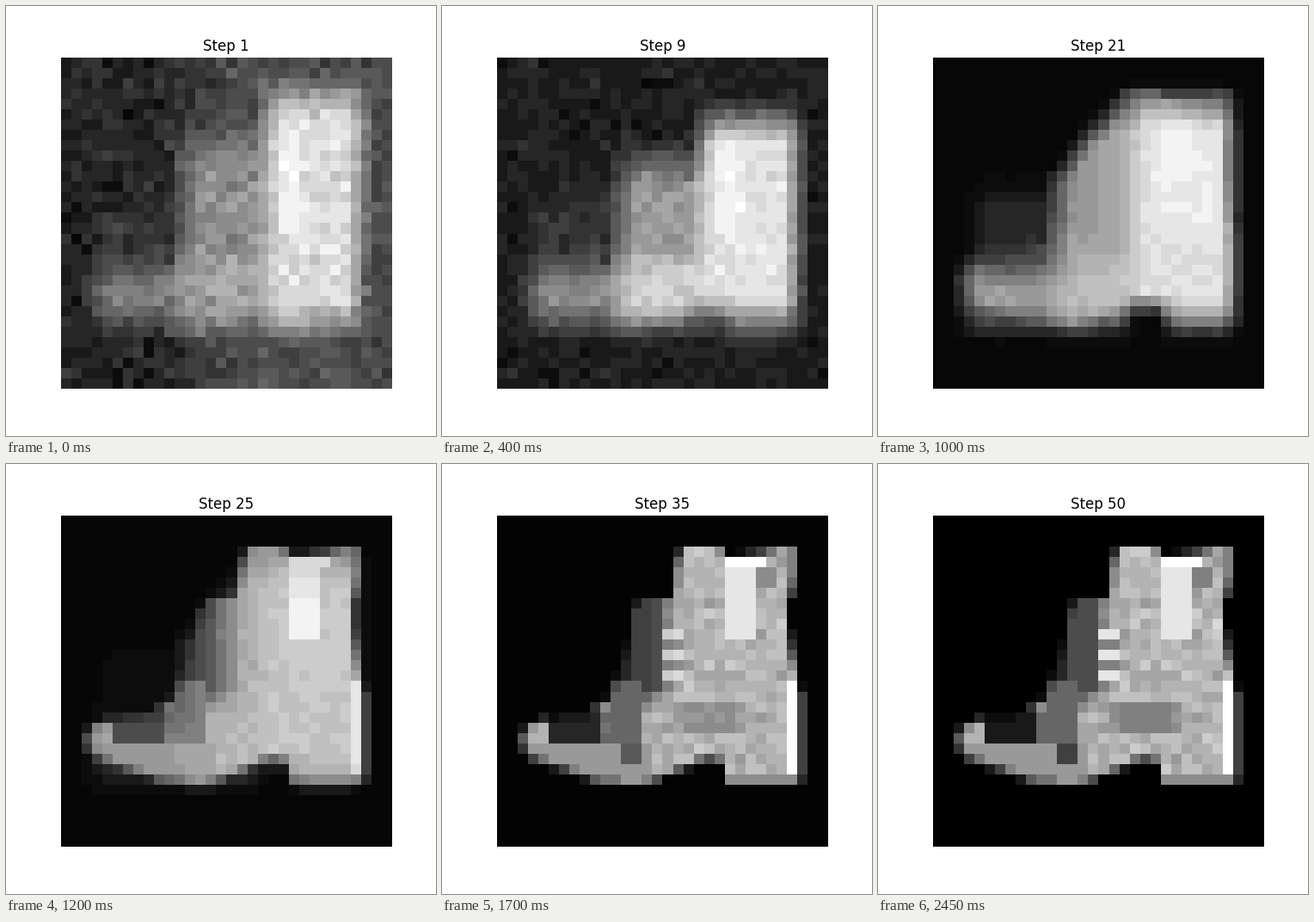
Recreate the animation shown at these times as a matplotlib script. Size 500 px wide and 500 px high, loop 2.5 s.

```python
import numpy as np
import matplotlib.pyplot as plt
from matplotlib.animation import FuncAnimation
from matplotlib.path import Path

N = 32
STEPS = 50
LEVELS = 20
SKETCH_END = 21

x = np.arange(N) + 0.5
y = x[:, None]
rng = np.random.default_rng(4)
grain_a, grain_b, texture = rng.standard_normal((3, N, N))


def smoothstep(start, end, s):
    t = np.clip((s - start) / (end - start), 0, 1)
    return t * t * (3 - 2 * t)


def rise(pos, edge, width):
    return np.clip((pos - edge) / width + 0.5, 0, 1)


def paint(img, value, left, right, top, bottom, wx=0.1, wy=0.1, weight=1):
    """Blend a value into a box; wx and wy are the widths of its soft edges."""
    across = rise(x, left, wx) * rise(-x, -right, wx)
    down = rise(y, top, wy) * rise(-y, -bottom, wy)
    img += (value - img) * across * down * weight


def coverage(points, sub=4):
    """Share of each cell that lies inside the polygon."""
    axis = (np.arange(N * sub) + 0.5) / sub
    px, py = np.meshgrid(axis, axis)
    inside = Path(points).contains_points(np.column_stack([px.ravel(), py.ravel()]))
    return inside.reshape(N, sub, N, sub).mean(axis=(1, 3))


outline = coverage([
    (18, 3), (21.4, 3), (22, 4), (25, 3.8), (28, 3), (29, 3), (29, 6),
    (28.1, 8), (28.1, 11.5), (29, 16), (29.35, 18), (29.35, 25), (29, 26),
    (22, 26), (22, 23.8), (20.3, 23.3), (14, 26), (10, 25.7), (3, 23.2),
    (2.4, 21.5), (3, 20.3), (5, 19.6), (9, 19), (11, 17.5), (13, 11.5),
    (13, 9.5), (14, 8), (17, 8), (17.3, 5),
])


def sketch(step):
    """Blurry masses of shaft, ankle and toe that sharpen as p goes to 1."""
    p = np.clip((step - 1) / (SKETCH_END - 1), 0, 1)
    late = p ** 4
    swell = np.sin(np.pi * p) ** 2
    ground = 0.14 * (1 - p * p)
    lean = 0.7 * late * np.maximum(0, 12 - y)

    img = np.full((N, N), ground)
    paint(img, 0.3, 13, 40, -9, 40, 8, 1, (1 - p) ** 8)
    paint(img, 0.2, 4, 13, 13, 20, 3, 5)
    paint(img, 0.48 + 0.14 * p, 3.2, 15, 20, 25.6, 3, 4)
    paint(img, 0.56 + 0.1 * p, 12 + lean, 23, 8 + 2.5 * swell - 3 * late, 25.4, 3, 5)
    paint(img, 0.65 + 0.1 * p + 0.15 * swell, 12, 22.5, 19.7, 25, 3, 3)
    paint(img, 0.86 + 0.05 * p, 20 - 0.6 * p, 28.9, 3.5 + p + 2.5 * swell, 25.6, 2.4, 4.5)
    paint(img, 1, 21, 23.5 + 4 * late, 8, 17, 1.5, 3, 0.7)
    paint(img, ground, 18.8, 22.8, 24, 40, 2, 3, min(1, 1.5 * p))
    return img


def boot(detail):
    img = 0.71 + texture * (0.02 + 0.03 * detail)

    # Tongue, instep and toe cap
    paint(img, 0.15, -9, 15.8, 7, 18, 4, 2)
    paint(img, 0.28, 13, 16, 8, 17, weight=detail)
    paint(img, 0.42, 11, 14, 16, 22, 1, 1)
    paint(img, 0.22 - 0.12 * detail, 5, 10.5, 19, 22)
    paint(img, 0.62, 3, 15, 22, 26)
    paint(img, 0.25, 12, 14, 22, 24, weight=detail)

    # Lining, collar and back edge
    paint(img, 0.92, 22, 25, 4, 12)
    paint(img, 1, 22, 26, 4, 5)
    paint(img, 0.5, 28, 29, 3, 7)
    paint(img, 0.48, 25, 27, 5, 7, weight=detail)
    paint(img, 1, 28, 30, 16, 25)

    # Seam, heel and laces
    paint(img, 0.52, 17, 24, 18, 21, 2, 1, detail)
    paint(img, 0.55, 22, 29, 25, 26)
    for row in range(11, 16):
        paint(img, 0.9 if row % 2 else 0.5, 16, 18, row, row + 1, weight=detail)
    return img.clip(0, 1) * outline


def picture(step):
    mix = smoothstep(18, 29, step)
    img = sketch(step) * (1 - mix) + boot(smoothstep(25, 40, step)) * mix
    turn = step * 0.07
    grain = np.cos(turn) * grain_a + np.sin(turn) * grain_b
    img += grain * 0.045 * max(0, 1 - step / 25)
    img = np.round(img.clip(0, 1) * LEVELS) / LEVELS
    floor = 0.03 * min(1, (STEPS - step) / (STEPS - SKETCH_END))
    return np.maximum(img, floor)


fig, ax = plt.subplots(figsize=(5, 5), dpi=100)
ax.axis("off")
view = ax.imshow(picture(1), cmap="gray", vmin=0, vmax=1)
title = ax.set_title("Step 1")


def update(i):
    view.set_data(picture(i + 1))
    title.set_text(f"Step {i + 1}")
    return view, title


anim = FuncAnimation(fig, update, frames=STEPS, interval=50, repeat=True)
plt.show()
```
